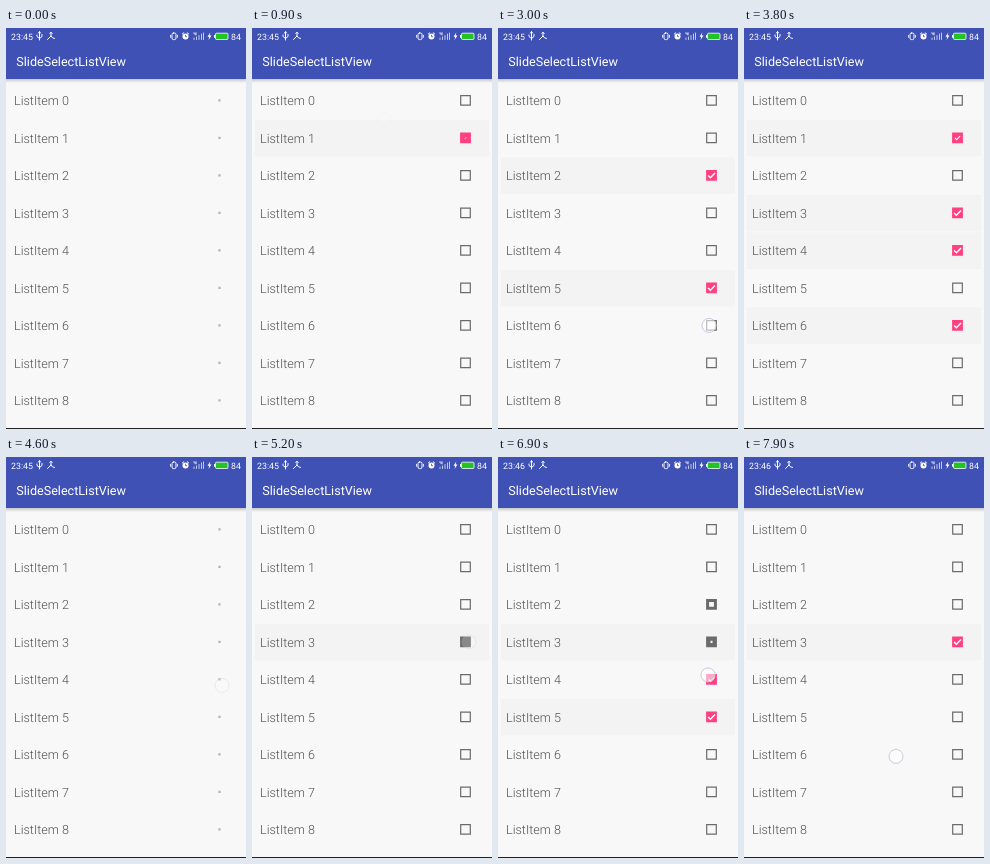
Recreate the animation shown at these times as an HTML page. Size 240 by 401 pixels, loop 8 s.

```html
<!DOCTYPE html>
<html lang="en">
<head>
<meta charset="utf-8">
<title>Slide select list</title>
<style>
html, body { margin: 0; width: 100%; height: 100%; overflow: hidden; background: #f8f8f8; }
svg { display: block; width: 240px; height: 401px; }
text { font-family: Roboto, "Open Sans", sans-serif; text-rendering: geometricPrecision; }
.item { font-size: 12.6px; font-weight: 300; fill: #505050; }
.status { font-size: 8.8px; fill: #fff; }
.icon { fill: none; stroke: #fff; stroke-width: 1; stroke-linecap: round; stroke-linejoin: round; }
</style>
</head>
<body>
<svg viewBox="0 0 240 401">
  <defs>
    <linearGradient id="shade" x2="0" y2="1">
      <stop stop-color="#000" stop-opacity=".2"/>
      <stop offset="1" stop-color="#000" stop-opacity="0"/>
    </linearGradient>
  </defs>
  <rect width="240" height="401" fill="#f8f8f8"/>
  <g id="list"></g>
  <rect y="51" width="240" height="4" fill="url(#shade)"/>
  <rect width="240" height="51" fill="#3f51b5"/>
  <text x="10.3" y="38.3" font-size="12.6" fill="#fff">SlideSelectListView</text>

  <text id="clock" class="status" x="5" y="11.5">23:45</text>
  <g class="icon">
    <path d="M33.5 4V12M31 7V8.5L33.5 10.5L36 8.5V6.5M32.5 5L33.5 3.5L34.5 5"/>
    <path d="M45 4.5V8L41.5 11.5M45 8Q46 10.5 48.5 10.5M43.8 5.5L45 4.2L46.2 5.5"/>
    <rect x="166" y="5" width="4" height="6.600" rx="1.500"/>
    <path d="M164.500 7.300V9.300M171.500 7.300V9.300" stroke-width=".8"/>
    <path d="M188 4.500V6H190M190 4.500V7M188 11.500V10M190.500 11.500V9M193 11.500V7.500M195.500 11.500V6M197.500 11.500V5" stroke-width=".7"/>
    <path d="M176.300 6L177.800 4.800M182.700 6L181.200 4.800"/>
  </g>
  <circle cx="179.500" cy="8.500" r="3" fill="#fff"/>
  <path d="M179.500 6.800V8.700H181" fill="none" stroke="#3f51b5" stroke-width=".8"/>
  <path d="M204.300 4.500L201.500 8.800H203.200L202.500 12L205.500 7.600H203.700Z" fill="#fff"/>
  <rect x="209.500" y="5.200" width="12.500" height="6.300" rx="1" fill="#22c322" stroke="#fff" stroke-width=".8"/>
  <rect x="208" y="7" width="1.200" height="2.800" fill="#fff"/>
  <text class="status" x="225" y="11.500">84</text>

  <circle id="touch" r="7" fill="#fff" fill-opacity=".55" stroke="#c9c9e2"/>
  <rect y="400" width="240" height="1" fill="#222"/>
</svg>
<script>
const LOOP = 8000, STEP = 100, ANIM = 500, ROW = 37.5;
const LEAVE = 4000, ENTER = 4600, SMALL = 0.22;
const GREY = '#6b6b6b', PINK = '#ff4081';

const clamp = v => Math.max(0, Math.min(1, v));
const ramp = (v, from, to) => clamp((v - from) / (to - from));
const rowY = i => 72.4 + ROW * i;
const $ = id => document.getElementById(id);

// A slide flips each row it passes, "pace" ms apart; a tap is a slide over one row.
const slide = (at, from, to, pace, x, dy = 0) => ({ at, from, to, pace, x, dy });
const tap = (at, row, x, dy) => slide(at, row, row, 1, x, dy);

const gestures = [
  ...[1, 3, 4, 6].map((row, k) => tap(600 + 375 * k, row, 133, -18)),
  slide(2060, 1, 6, 80, 213),
  slide(3040, 6, 1, 80, 211),
  tap(4380, 4, 216, 6),
  tap(4980, 3, 217, 0),
  slide(5500, 1, 5, 125, 219),
  slide(6500, 1, 5, 125, 210),
  tap(LOOP, 6, 152, 2)
];

function add(parent, tag, attrs) {
  const el = document.createElementNS('http://www.w3.org/2000/svg', tag);
  for (const k in attrs) el.setAttribute(k, attrs[k]);
  return parent.appendChild(el);
}

const rows = Array.from({ length: 9 }, (_, i) => {
  const y = rowY(i), list = $('list');
  const glow = add(list, 'rect', { x: 3, y: y - 18, width: 234, height: 36.5, fill: '#f3f3f3' });
  const label = add(list, 'text', { class: 'item', x: 8, y: y + 5 });
  label.textContent = 'ListItem ' + i;
  const box = add(list, 'g', {});
  const frame = add(box, 'path', { 'fill-rule': 'evenodd' });
  const tick = add(box, 'path', { d: 'M-3.4 .1L-1.1 2.4L3.5 -2.4', fill: 'none', stroke: '#fff', 'stroke-width': 1.4 });
  return { y, glow, box, frame, tick };
});

function boxScale(t) {
  const shown = t < LEAVE ? ramp(t, 50, 300) : ramp(t, ENTER, ENTER + 250);
  const leaving = t < ENTER ? ramp(t, LEAVE, LEAVE + 200) : 0;
  const open = t >= LEAVE && t < ENTER ? 1 - leaving : shown;
  return SMALL + (1 - SMALL) * open;
}

function rowState(t, i) {
  const start = t < LEAVE ? 0 : ENTER;
  const flips = gestures
    .filter(g => (i - g.from) * (i - g.to) <= 0)
    .map(g => g.at + Math.abs(i - g.from) * g.pace)
    .filter(at => at >= start && at <= t);
  return { on: flips.length % 2 === 1, p: flips.length ? clamp((t - flips.pop()) / ANIM) : 1 };
}

// hole: size of the empty middle, tick: scale of the check mark
function boxLook({ on, p }) {
  if (on) {
    return p < 0.57
      ? { hole: 1 - ramp(p, 0, 0.4), tick: 0, color: GREY }
      : { hole: 0, tick: 0.25 + 0.75 * ramp(p, 0.57, 0.8), color: PINK };
  }
  return p < 0.35
    ? { hole: 0, tick: Math.max(0.25, 1 - p / 0.35), color: PINK }
    : { hole: 1 - (1 - ramp(p, 0.4, 1)) ** 3, tick: 0, color: GREY };
}

const square = h => `M${-h} ${-h}H${h}V${h}H${-h}Z`;

function drawRow(row, i, t) {
  const state = rowState(t, i), look = boxLook(state), s = boxScale(t);
  const hole = 4.2 * look.hole * ramp(s, SMALL, 0.5);
  row.glow.style.display = state.on ? '' : 'none';
  row.box.setAttribute('transform', `translate(213.5 ${row.y}) scale(${s})`);
  row.box.setAttribute('opacity', 0.3 + 0.7 * s);
  row.frame.setAttribute('d', square(5.4) + square(hole));
  row.frame.setAttribute('fill', look.color);
  row.tick.setAttribute('transform', `scale(${look.tick})`);
  row.tick.style.display = look.tick ? '' : 'none';
}

function drawTouch(t) {
  const press = 120, lag = 40, fade = 280;
  const length = g => Math.abs(g.to - g.from) * g.pace;
  const end = g => g.at + lag + length(g);
  const g = gestures.find(g => t >= g.at - press && t < end(g) + fade);
  $('touch').style.display = g ? '' : 'none';
  if (!g) return;
  const passed = length(g) ? ramp(t, g.at + lag, end(g)) : 0;
  const y = rowY(g.from + (g.to - g.from) * passed) + g.dy;
  $('touch').setAttribute('transform', `translate(${g.x} ${y})`);
  $('touch').setAttribute('opacity', 1 - ramp(t, end(g), end(g) + fade));
}

function draw(now) {
  const t = Math.floor((now % LOOP) / STEP) * STEP;
  rows.forEach((row, i) => drawRow(row, i, t));
  drawTouch(t);
  $('clock').textContent = t < 5500 ? '23:45' : '23:46';
}

const begin = performance.now();
function loop() {
  draw(performance.now() - begin);
  requestAnimationFrame(loop);
}
loop();
</script>
</body>
</html>
```
